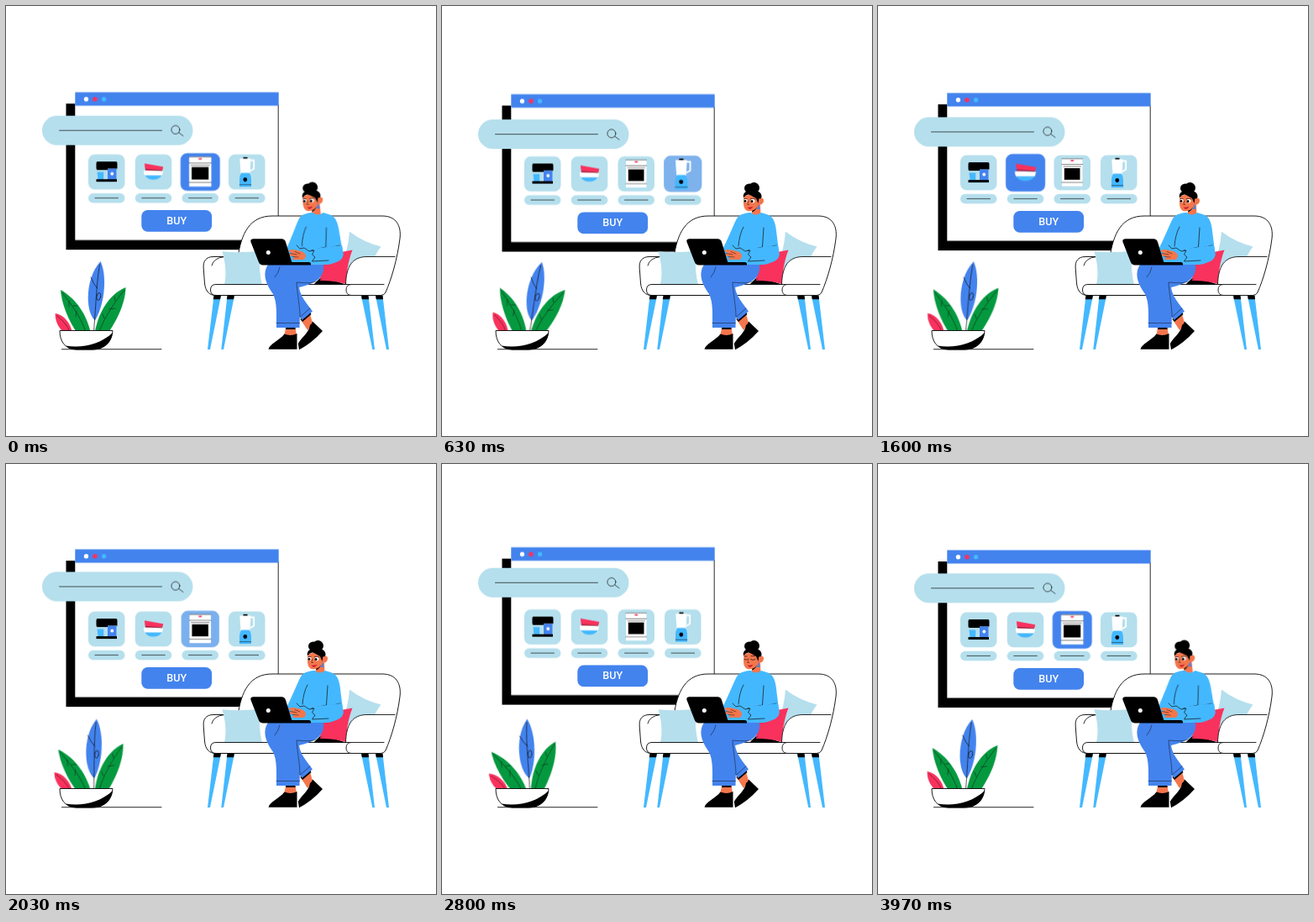
An HTML page that plays this animation: 512 px wide and 512 px high, repeating every 4 s.

```html
<!DOCTYPE html>
<html lang="en">
<head>
<meta charset="utf-8">
<title>Shopping from the sofa</title>
<style>
  html, body { margin: 0; width: 100%; height: 100%; overflow: hidden; background: #fff; }
  svg { display: block; width: 100vw; height: 100vh; }

  .blue { fill: #4383ee; }
  .sky { fill: #44b8ff; }
  .pale { fill: #b5dfed; }
  .red { fill: #f9325d; }
  .green { fill: #05993f; }
  .skin { fill: #f4764c; }
  .white { fill: #fff; }
  .line { fill: none; stroke: #111; stroke-width: .9; stroke-linecap: round; stroke-linejoin: round; }
  .edge { fill: #fff; stroke: #000; stroke-width: .9; stroke-linejoin: round; }
  .thin { stroke-width: .7; }
  .hair { stroke-width: .5; }
  .buy-text { font: 500 12.6px Roboto, Arial, sans-serif; fill: #fff; text-anchor: middle; }

  /* Floating and swaying: a sine wave with a 4 s period */
  .float, .leaf { animation: 2s cubic-bezier(.364, 0, .636, 1) infinite alternate; }
  .float { animation-name: float; animation-delay: -3.1s; }
  .window { --a: 3.1px; }
  .search { --a: 6px; }
  @keyframes float {
    from { transform: translateY(calc(var(--a) - .3px)); }
    to { transform: translateY(calc(-.3px - var(--a))); }
  }
  .leaf { animation-name: sway; animation-delay: -3.15s; }
  @keyframes sway {
    from { transform: rotate(4.8deg); }
    to { transform: rotate(-7.6deg); }
  }

  .tile, .buy { transform-box: fill-box; transform-origin: center; }
  .tile { color: #b5dfed; animation: hover 4s linear infinite; }
  .tile > :first-child { fill: currentColor; }
  .t1 { animation-delay: -3.17s; }
  .t2 { animation-delay: -2.61s; }
  .t3 { animation-name: choose; }
  .t4 { animation-delay: -3.73s; }
  @keyframes hover {
    0%, 11%, 100% { color: #b5dfed; transform: none; }
    4%, 7% { color: #4383ee; transform: scale(1.08); }
  }
  @keyframes choose {
    0%, 2.5%, 52.75%, 55.75%, 80%, 100% { color: #4383ee; transform: scale(1.08); }
    6.5%, 48.75%, 59.75%, 76% { color: #b5dfed; transform: none; }
  }
  .buy { animation: press 4s ease-in-out infinite; }
  @keyframes press {
    0%, 83%, 94%, 100% { transform: none; }
    88.25% { transform: scale(1.04); }
  }

  .head { transform-origin: 371px 235px; animation: look 4s ease-in-out infinite; }
  @keyframes look {
    0%, 3%, 80%, 100% { transform: translate(-5.5px, -.5px) rotate(-4deg); }
    10%, 73% { transform: none; }
  }
  .torso { transform-origin: 372px 300px; animation: lean 4s ease-in-out infinite; }
  @keyframes lean {
    0%, 3%, 80%, 100% { transform: skewX(2.5deg); }
    10%, 73% { transform: skewX(0deg); }
  }
  .open { animation: blink 4s step-end infinite; }
  .shut { animation: closed 4s step-end infinite; }
  @keyframes blink { 0%, 72.5% { opacity: 1; } 68% { opacity: 0; } }
  @keyframes closed { 0%, 72.5% { opacity: 0; } 68% { opacity: 1; } }
</style>
</head>
<body>
<svg viewBox="0 0 512 512">
  <defs>
    <g id="pill">
      <rect class="pale" x="98" y="222.7" width="43.5" height="11.6" rx="5.8"/>
      <path class="line thin" d="M106 228.4H133.5"/>
    </g>
  </defs>

  <!-- Shop window -->
  <g class="float window">
    <path d="M71.5 116H313V290H71.5Z"/>
    <path class="white" d="M82.3 102.4H324.5V278.6H82.3Z"/>
    <path class="line" d="M324.2 118V278"/>
    <path class="blue" d="M82.3 102.4H324.7V118.4H82.3Z"/>
    <circle class="white" cx="95.5" cy="110.7" r="2.7"/>
    <circle class="red" cx="106" cy="110.7" r="2.7"/>
    <circle class="sky" cx="116.6" cy="110.7" r="2.7"/>

    <use href="#pill"/>
    <use href="#pill" x="55.8"/>
    <use href="#pill" x="111.5"/>
    <use href="#pill" x="167.1"/>

    <g class="tile t1">
      <rect x="98" y="176.6" width="43.5" height="41.6" rx="7.5"/>
      <path d="M109 185H131Q132.5 185 132.5 187V193.5H121V206H132V209H107.5V206H117V195H109Q107.5 195 107.5 193V187Q107.5 185 109 185Z"/>
      <path class="sky" d="M108.5 197.5H116.5V206H109.5Z"/>
      <path class="pale" d="M116.5 195H121V206H116.5Z"/>
      <path class="blue" d="M121 193.5H131.5V206H121Z"/>
      <circle class="white" cx="126.3" cy="199.5" r="1.9"/>
    </g>
    <g class="tile t2">
      <rect x="153.8" y="176.6" width="43.5" height="41.6" rx="7.5"/>
      <path class="red" d="M165 187.3L187.2 191.3Q187 194 185.8 196H166.5Q165 192 165 187.3Z"/>
      <path class="white" d="M163.8 195.8H187C187 198 186.5 200 185.5 201.7H165.3Q163.8 199 163.8 195.8Z"/>
      <path class="sky" d="M165.3 201.5H185.5C183.5 204.5 180 206.5 175.4 206.5S167.3 204.5 165.3 201.5Z"/>
      <path class="line hair" d="M166 194.3L186 196"/>
    </g>
    <g class="tile t3">
      <rect x="209.5" y="176.6" width="43.5" height="41.6" rx="7.5"/>
      <path class="white" d="M219 180.5H243.5V213.5H219Z"/>
      <path d="M221.8 192H240.5V205.8H221.8Z"/>
      <path class="red" d="M229.5 182.2H233V183.8H229.5Z"/>
      <path class="line hair" d="M219 180.8H243.5M219 187.5H243.5M221 190H241.5M219 209H243.5"/>
    </g>
    <g class="tile t4">
      <rect x="265" y="176.6" width="43.5" height="41.6" rx="7.5"/>
      <path d="M282.5 179.8H287.5V182H282.5Z"/>
      <path d="M291 183.5H295.2V193.5L291 196" fill="none" stroke="#fff" stroke-width="1.8"/>
      <path class="white" d="M278.3 181.5H291.5L290.5 199H279.5Z"/>
      <path class="sky" d="M280.5 198.5H289.5Q292 201 292 207V215H278V207Q278 201 280.5 198.5Z"/>
      <circle cx="284.8" cy="206.5" r="2.4"/>
      <path class="line hair" d="M278.2 212.5H291.8"/>
    </g>

    <g class="buy">
      <rect class="blue" x="161.3" y="242.9" width="83.8" height="25.7" rx="7.5"/>
      <text class="buy-text" x="203.2" y="259.8">BUY</text>
    </g>
  </g>

  <g class="float search">
    <rect class="pale" x="43" y="130" width="179.5" height="35" rx="17.5"/>
    <path class="line thin" d="M63.5 147.5H185.5M205.6 150L211 154"/>
    <circle class="line thin" cx="201.9" cy="146.7" r="5"/>
  </g>

  <!-- Plant -->
  <path class="line" d="M66.5 408.7H185"/>
  <g class="leaf" style="transform-origin: 78px 389px">
    <path class="red" d="M79 390C77 377 69 368 58.7 366C58 376 64 386 72 391Z"/>
    <path class="line hair" d="M61 369C67 374 73 380 76 388"/>
  </g>
  <g class="leaf" style="transform-origin: 104px 388px">
    <path class="blue" d="M112.5 304C119.7 319 119 352 106 374.5C94 364 94 324 112.5 304Z"/>
    <path class="line thin" d="M111.5 308C107.5 332 107.5 350 104.5 388M101 323Q104 331 108.5 336"/>
    <ellipse class="line thin" cx="110.3" cy="346" rx="2.3" ry="4.5" transform="rotate(12 110.3 346)"/>
  </g>
  <g class="leaf" style="transform-origin: 98px 388px">
    <path class="green" d="M65 338C66 354 74 374 85 390H101C97 371 86 350 65 338Z"/>
    <path class="line hair" d="M66.5 341C77 354 89 370 95 388M75 351V358M84 363L83 370M80 357L85 357"/>
  </g>
  <g class="leaf" style="transform-origin: 105px 388px">
    <path class="green" d="M142.5 335C125 342 110 362 105.5 390H121C131 376 142 355 142.5 335Z"/>
    <path class="line hair" d="M141 338C129 353 117 371 111 388M130 351L129 346M123 361L130 360M117 372L115 367"/>
  </g>
  <path class="edge" d="M64 386.5H127C126.5 400 117 409 103 409H84C70 409 64 399 64 386.5Z"/>
  <path d="M127 389C125 402 116 409.3 103 409.3H84Q76 409 71 404.5C90 408 112 403 127 389Z"/>

  <!-- Sofa -->
  <path class="sky" d="M247.5 345H256L243 409H240ZM263.5 345H272L259 409H256.3ZM423 345H431.5L439 409H436.3ZM440 345H448.5L456 409H453Z"/>
  <path d="M247.6 344.5H256L255 349.3H246.8ZM263.6 344.5H272L271 349.3H262.8ZM423 344.5H431.5L432 349.3H423.8ZM440 344.5H448.5L449 349.3H440.8Z"/>
  <path class="edge" d="M276 300C280 271 290 250 317 250H448C464 250 471 261 469 277C466 301 459 325 452 341Q450.5 344.5 446 344.5H270Z"/>
  <path class="edge" d="M300 298.5H247C238 298.5 234.5 304 235.2 312L236.5 330C237.5 340 242 344.5 250 344.5H300Z"/>
  <path class="white" d="M277 297H310V332H277Z"/>
  <path class="line" d="M245 309Q247 300 260 298.5"/>
  <path class="pale" d="M257.5 292.2C273 294 288 293 303 291.5C301 306 302 319 305 332H260C263 318 261 305 257.5 292.2Z"/>
  <path class="pale" d="M409 268.5C420 277 433 283 446.5 286.5C439 296 435 308 432 320L400 308C405 295 408 282 409 268.5Z"/>
  <path d="M366 332L376 322L406 332Z"/>
  <path class="red" d="M376 296C389 295 400 293 412.5 290.5C407 305 405 318 406 331.5C395 328 386 327 374 327Z"/>
  <path class="white" d="M463 298.5H430C413 298.5 405 309 404.5 331.5H452Z"/>
  <path class="line" d="M463 298.5H430C413 298.5 405 309 404.5 331.5"/>
  <path class="edge" d="M411 331.5H250Q243.5 331.5 243.5 338T250 344.5H411Z"/>
  <path class="white" d="M452 331.5H411Q405 332 405 338T411 344.5H446Z"/>
  <path class="line" d="M450 331.5H411Q405 332 405 338T411 344.5H446"/>

  <!-- Legs -->
  <path class="skin" d="M333.5 382H344.5L346 393H331ZM350 372L361 363L365.500 379L359 386Z"/>
  <path d="M333 382H344.5V385H333ZM350.500 373L362 364L363.500 367L353 376Z"/>
  <path d="M331.500 390.500Q339 393.500 346.500 390V408.800H312.500C314 402 326 398 331.500 390.500Z"/>
  <path d="M365 375.500L377 387C368 397 359 404 349 409.300L347.800 402C352 394 361 389 362 380Q364.500 379 365 375.500Z"/>
  <path class="blue" d="M312 308H378C379.500 322 371 330 349 335C350 345 358 354 365 363.500L352.500 374L349.800 370L349.500 383H322C322 368 323 353 318 343C311 333 304 320 312 308Z"/>
  <path class="line hair" d="M322 377.500H349.500M350.500 370L362 360M376 325C368 331 357 330 346 329C347 346 350 356 350 370M326 311Q325 317 320 323"/>

  <!-- Head and neck -->
  <g class="head">
    <path class="skin" d="M369.500 236H379L379.500 251H368.500Z"/>
    <path d="M369.300 242.500L375 239Q374 243 369.300 245.500Z"/>
    <path class="skin" d="M360 226C358 236 359 242.500 364 244.200C370 245 375 242 376.500 236Q381.500 238 383 232.500Q383.500 228 379 228.500L376 223Z"/>
    <ellipse cx="366" cy="217" rx="6" ry="5.500"/>
    <circle cx="371.500" cy="216.500" r="6.500"/>
    <path d="M359 228.500C357.500 222 363 219.500 370 219.500C378 219.500 382 224 380 229L377.300 229.500L376.500 235L374 229C370 227 367 224.500 365 224.500Q361 225 359 228.500Z"/>
    <g class="open">
      <ellipse class="white" cx="361.700" cy="231.800" rx="1.900" ry="2.300"/>
      <circle class="white" cx="370" cy="232" r="2.500"/>
      <circle cx="361" cy="232.300" r="1.400"/>
      <circle cx="369" cy="232.500" r="1.500"/>
      <path class="line thin" d="M359.700 229.600H363M367.300 229.700Q370 228.500 373 230"/>
    </g>
    <path class="line thin shut" d="M360 232.500Q361.700 234 363.500 232.500M367.500 232.500Q370 234.500 373 232.500M360 229H363M368 228.700H372.500"/>
    <path class="line hair" d="M365 232L363.800 236.500H365.500"/>
    <path d="M363.500 239.500Q367.500 240.500 370.500 238.500Q368.500 242.500 365.500 241.500Z" fill="#c90f32"/>
    <path class="blue" d="M377 235.500L378.500 242H374.800Z"/>
  </g>

  <!-- Body and laptop -->
  <g class="torso">
    <path class="sky" d="M359 247.500Q363 245.500 368 246Q373 251 380 246L388 248.500C395 251 397.500 259 398.500 272L401.500 295C402 302 394 306 383 308H338L334 290C341 276 346 263 350.500 254Q353.500 248.500 359 247.500Z"/>
    <path class="line thin" d="M383 264L381.500 287L364 291M359 263Q354 272 353 286M398 285Q388 288 377 289"/>
  </g>
  <path class="sky" d="M366 289L400 285L401.500 295C402 302 394 305.500 383 306L365 304.500Z"/>
  <path class="line thin" d="M346 285L350 289L355 288L361 292L367 291L364.500 296L368 299L364.500 304L384 303"/>
  <path class="skin" d="M336 291.500C340 288.500 345 291 349 291.500C354 292 357.500 295 357 298.500L355 302H341L343 298.500L336 297L340 294Z"/>
  <path class="line hair" d="M338 294.500L346 296M341 298.500L348 299M344 292.500L350 295"/>
  <path d="M294.500 277.300H328Q331.800 277.300 333 281L340.300 305H361Q363.500 305.500 363 308.500H306Q302 308.500 300.700 304.500L291.500 281Q290.500 277.500 294.500 277.300Z"/>
  <circle class="white" cx="312.300" cy="293.500" r="2.500"/>
</svg>
</body>
</html>
```
